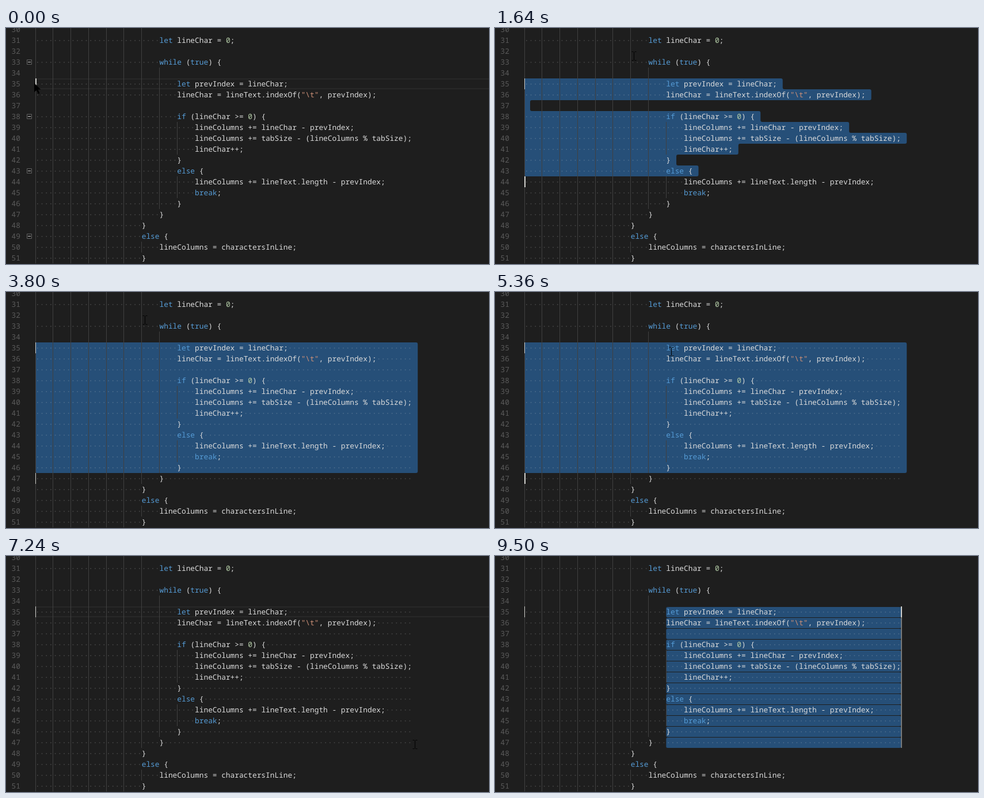
Animation of 839 by 412 pixels, one loop 9.9 s. Source, as an HTML page:

```html
<!DOCTYPE html>
<html lang="en">
<head>
<meta charset="utf-8">
<title>Column selection</title>
<style>
html, body { margin: 0; width: 100%; height: 100%; overflow: hidden; background: #1e1e1e; }
svg { display: block; width: 100%; height: 100%; }
text {
  font: 12.828px "Noto Sans Mono", "DejaVu Sans Mono", monospace;
  white-space: pre; text-rendering: geometricPrecision; fill: #dcdcdc;
}
.num { fill: #5a5a5a; }
.key { fill: #569cd6; }
.str { fill: #ce9178; }
.lit { fill: #b5cea8; }
.dots { stroke: #e3e4e2; stroke-opacity: .18; stroke-width: 1.7; stroke-dasharray: 1.7 5.997; }
.guide { fill: #404040; }
.sel { fill: #264f78; }
.caret { fill: #d0d0cc; }
</style>
</head>
<body>
<svg viewBox="0 0 839 412"></svg>
<script>
const LOOP = 9900, LEFT = 51, CHAR = 7.697, ROW = 19, FIRST = 30, PAD = 85;
const CLEAR = 5520, PADDED = 3800, COLUMN = 7470;

// [indent, text] per line, starting at line 30
const code = [
  [28, ''],
  [28, 'let lineChar = 0;'],
  [28, ''],
  [28, 'while (true) {'],
  [32, ''],
  [32, 'let prevIndex = lineChar;'],
  [32, 'lineChar = lineText.indexOf("\\t", prevIndex);'],
  [32, ''],
  [32, 'if (lineChar >= 0) {'],
  [36, 'lineColumns += lineChar - prevIndex;'],
  [36, 'lineColumns += tabSize - (lineColumns % tabSize);'],
  [36, 'lineChar++;'],
  [32, '}'],
  [32, 'else {'],
  [36, 'lineColumns += lineText.length - prevIndex;'],
  [36, 'break;'],
  [32, '}'],
  [28, '}'],
  [24, '}'],
  [24, 'else {'],
  [28, 'lineColumns = charactersInLine;'],
  [24, '}']
];

// [time, line holding the caret]
const steps = [[790, 36], [1320, 39], [1400, 41], [1480, 43],
  [1640, 44], [1800, 45], [2020, 46], [2190, 47]];

// [time, x, y] of the mouse
const path = [
  [0, 49, 96], [80, 110, 86], [160, 180, 64], [240, 241, 49],
  [4640, 241, 49], [4720, 225, 60], [4800, 262, 92], [4880, 310, 119], [4960, 339, 129],
  [5040, 339, 129], [5360, 306, 104], [5440, 306, 104], [5520, 304, 98],
  [5680, 304, 98], [6000, 450, 160], [6240, 566, 219],
  [6320, 566, 219], [6800, 769, 349], [6880, 769, 349], [7200, 710, 329],
  [7680, 710, 329], [8480, 776, 401]
];

const svg = document.querySelector('svg');
const X = col => LEFT + col * CHAR;
const Y = line => (line - FIRST) * ROW - 7;
const lineEnd = line => {
  const [indent, text] = code[line - FIRST];
  return text ? indent + text.length : 0;
};

function add(parent, tag, attrs = {}, text) {
  const el = document.createElementNS('http://www.w3.org/2000/svg', tag);
  for (const k in attrs) el.setAttribute(k, attrs[k]);
  if (text) el.textContent = text;
  parent.append(el);
  return el;
}
const box = (parent, x, y, width, height, cls) =>
  add(parent, 'rect', { x, y, width, height, class: cls });
const show = (el, on) => el.setAttribute('visibility', on ? 'visible' : 'hidden');

const highlight = add(svg, 'rect',
  { x: 52, y: Y(35) + 1, width: 800, height: 17, fill: 'none', stroke: '#282828', 'stroke-width': 2 });
const selection = add(svg, 'path', { class: 'sel' });
const columnSel = add(svg, 'g');
const guides = add(svg, 'g');
const dots = add(svg, 'g');
const padding = add(svg, 'g');
const texts = add(svg, 'g');
const folds = add(svg, 'g');

function drawDots(parent, line, from, to) {
  const x = X(from) + (CHAR - 1.7) / 2, y = Y(line) + 9.8;
  add(parent, 'path', { class: 'dots', d: `M${x} ${y}H${X(to) - 1}` });
}

function drawText(line, indent, text) {
  const el = add(texts, 'text', { x: X(indent), y: Y(line) + 14 });
  for (const part of text.match(/"[^"]*"|\w+|[^\w"]+/g)) {
    const cls = part[0] === '"' ? 'str'
      : /^(let|while|true|if|else|break)$/.test(part) ? 'key'
      : /^\d+$/.test(part) ? 'lit' : 'txt';
    add(el, 'tspan', { class: cls }, part);
  }
}

code.forEach(([indent, text], i) => {
  const line = FIRST + i;
  add(texts, 'text', { x: 9.6, y: Y(line) + 14, class: 'num' }, String(line));
  for (let col = 0; col < indent; col += 4)
    box(guides, Math.floor(X(col)), Y(line), 1, ROW, 'guide');
  if (text) {
    drawDots(dots, line, 0, indent);
    drawText(line, indent, text);
  }
  if (line > 34 && line < 48 && lineEnd(line) < PAD) drawDots(padding, line, lineEnd(line), PAD);
});

for (const line of [33, 38, 43, 49]) {
  const y = Y(line) + 5.5;
  add(folds, 'path', { d: `M36.5 ${y}h8v8h-8z`, fill: 'none', stroke: '#606060' });
  add(folds, 'path', { d: `M38 ${y + 4}h5`, stroke: '#c5c5c5' });
}

const columnCarets = add(svg, 'g');
for (let line = 35; line < 48; line++) {
  add(columnSel, 'rect',
    { x: X(32), y: Y(line) + 1, width: 53 * CHAR, height: ROW - 1, rx: 2.5, class: 'sel' });
  box(columnCarets, 705, Y(line), 2, ROW, 'caret').setAttribute('opacity', line > 35 ? .5 : 1);
}

box(svg, LEFT, Y(35), 1, ROW, 'caret');
const caret = box(svg, LEFT, Y(35), 2, ROW, 'caret');
const arrow = add(svg, 'path', { d: 'M0 0v16l4-3.5 3 6.5 2.5-1-3-6.5h5z' });
const beam = add(svg, 'path',
  { d: 'M-3.5 -7.5h3M1.5 -7.5h3M-3.5 7.5h3M1.5 7.5h3M.5 -7v14', stroke: '#000', fill: 'none' });

// Outline of the selected rows, with rounded outer and inner corners
function outline(last, padded) {
  const r = 3, right = line => X(padded ? PAD : lineEnd(line)) + 10;
  let a = right(35), y = Y(35);
  let d = `M${LEFT} ${y}H${a - r}Q${a} ${y} ${a} ${y + r}`;
  for (let line = 36; line < last; line++) {
    const b = right(line), s = Math.sign(b - a) * r;
    y = Y(line);
    if (s) d += `V${y - r}Q${a} ${y} ${a + s} ${y}H${b - s}Q${b} ${y} ${b} ${y + r}`;
    a = b;
  }
  y = Y(last);
  return d + `V${y - r}Q${a} ${y} ${a - r} ${y}H${LEFT + r}Q${LEFT} ${y} ${LEFT} ${y - r}Z`;
}

function mouseAt(t) {
  const q = Math.floor((t + 10) / 80) * 80;
  const i = path.findIndex(p => p[0] > q);
  if (i < 0) return path[path.length - 1].slice(1);
  const [t0, x0, y0] = path[i - 1], [t1, x1, y1] = path[i];
  const k = (q - t0) / (t1 - t0);
  return [Math.round(x0 + (x1 - x0) * k), Math.round(y0 + (y1 - y0) * k)];
}

function render(t) {
  const selecting = t >= steps[0][0] && t < CLEAR;
  const column = t >= COLUMN;
  const blink = start => Math.floor((t - start) / 500) % 2 === 0;

  show(highlight, !selecting && !column);
  show(selection, selecting);
  show(columnSel, column);
  show(padding, t >= PADDED);
  show(columnCarets, column && blink(COLUMN));

  let line = 35, x = LEFT, width = 2;
  if (selecting) {
    line = steps.filter(s => s[0] <= t).pop()[1];
    selection.setAttribute('d', outline(line, t >= PADDED));
    if (t >= 2650 && t < 5130) width = 1;
  } else if (t >= CLEAR) {
    x = 297;
    width = !column && blink(CLEAR) ? 2 : 0;
  } else if (t >= 470) width = 1;
  caret.setAttribute('x', x);
  caret.setAttribute('y', Y(line));
  caret.setAttribute('width', width);

  folds.setAttribute('opacity', t < 80 ? 1 : t < 150 ? .6 : t < 230 ? .3 : 0);

  const at = `translate(${mouseAt(t)})`;
  arrow.setAttribute('transform', at);
  beam.setAttribute('transform', at);
  show(arrow, t < 70);
  show(beam, t >= 70 && t < 8580);
}

const begin = performance.now();
function tick() {
  render((performance.now() - begin) % LOOP);
  requestAnimationFrame(tick);
}
tick();
</script>
</body>
</html>
```
